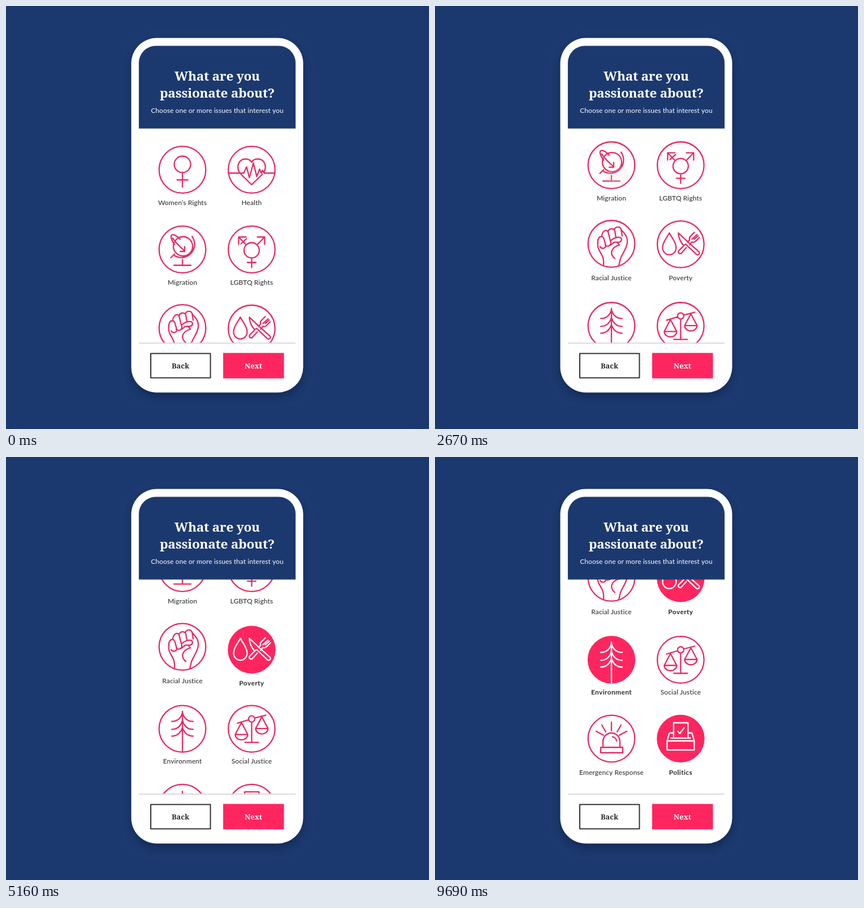
An HTML page with a canvas that plays this animation: 748 by 748 pixels, repeating every 9.72 s.

```html
<!DOCTYPE html>
<html lang="en">
<head>
<meta charset="utf-8">
<title>Choose your issues</title>
<style>
  html, body { margin: 0; width: 100%; height: 100%; overflow: hidden; background: #1c396f; }
  canvas { display: block; }
</style>
</head>
<body>
<canvas id="stage" width="748" height="748"></canvas>
<script>
const ctx = document.getElementById('stage').getContext('2d');
const LOOP = 9720;
const NAVY = '#1c396f', PINK = '#ff265f', LINE = '#e62a63', INK = '#363636';
const SERIF = '"Noto Serif", serif', SANS = 'Lato, sans-serif';

// Icon outlines, relative to the centre of their circle.
const ICONS = {
  venus: 'M14.5 -9.5 A14.5 14.5 0 1 1 -14.5 -9.5 A14.5 14.5 0 1 1 14.5 -9.5 M0 5 V30.5 M-9.5 18 H9.5',
  heart: 'M-41 6 H-14 L-9 -5 L-4 14 L3 -12 L9 12 L14 -1 L17 6 L19 1 L22 6 H41' +
    'M-22 4 C-28 -8 -21 -19 -11 -19 C-5 -19 -2 -17 0 -13 C2 -17 5 -19 11 -19 C21 -19 28 -8 22 4' +
    'M-19 8 L0 26.5 L19 8',
  globe: 'M18 -5.5 A17 17 0 1 1 -16 -5.5 A17 17 0 1 1 18 -5.5' +
    'M17 -23 A23.5 23.5 0 0 1 -14 11 M-20.5 14.5 L-14 8' +
    'M-14 -9 C-20 -17 -22 -25 -18 -26 C-14 -27 -9 -23 -4 -18' +
    'M-17 -20 C-14 -13 -4 -5 4 3 M-4 3.5 H4 V-5 M0 18 V28 M-15 28 H15',
  trans: 'M13.5 1.5 A13.5 13.5 0 1 1 -13.5 1.5 A13.5 13.5 0 1 1 13.5 1.5' +
    'M0 15 V32 M-7.5 23 H7.5 M9.5 -8 L23 -22 M10 -22 H23 V-9' +
    'M-9.5 -8 L-23 -22 M-10 -22 H-23 V-9 M-19 -10 L-9 -19',
  fist: 'M-14 39 C-13 28 -15 23 -19 16 C-23 10 -25 5 -24 0' +
    'C-25 -8 -22 -13 -18 -13 C-15 -13 -14 -11 -13 -8 L-10 3 C-10 8 -17 10 -20 5' +
    'M-17 -13 C-17 -22 -9 -27 -6 -21 L-1 -2 C-1 4 -8 6 -11 2' +
    'M-6 -21 C-5 -28 4 -28 6 -23 L8 -11 M5 -25 C7 -31 15 -31 17 -26 L19 -14' +
    'M17 -25 C25 -17 29 -11 28 -2 C27 8 19 18 16 26 L13 39' +
    'M-2 -5 C3 -10 11 -13 16 -11 C19 -9 18 -4 14 -3 L6 -3 C2 -2 1 2 -3 3' +
    'M11 -2 L14 2 C3 5 -4 14 3 23 L6 26',
  food: 'M-20 -20 C-24 -12 -32 -4 -32 6 A12 12.5 0 0 0 -8 6 C-8 -4 -16 -12 -20 -20 Z' +
    'M-4 -20 L13 -4 L32 13 A3 3 0 0 1 28 18 L9 0 L5 2 C-1 -5 -4 -12 -4 -20 Z' +
    'M5 3 L-3 11 A3 3 0 0 0 1 16 L10 6 M12 -4 L16 -8 M16 1 L20 -4' +
    'M24 -21 L17 -14 C15 -12 15 -10 16 -8 M20 -4 C22 -3 25 -4 27 -6 L33 -12 M20 -9 L29 -17 M24 -9 L31 -15',
  tree: 'M0 -31 V41 M-19 -13 C-9 -13 -2 -19 0 -29 C2 -19 9 -13 19 -13' +
    'M-19 1 C-10 1 -3 -4 0 -15 C3 -4 10 1 19 1 M-19 13 C-11 13 -4 9 0 -2 C4 9 11 13 19 13',
  scales: 'M5.5 -17.5 A5.5 5.5 0 1 1 -5.5 -17.5 A5.5 5.5 0 1 1 5.5 -17.5' +
    'M-25 -10 L-5 -16 M5 -19 L25 -24 M0 -12 V24 M-12 24 H12' +
    'M-18 -11 L-29 10 H-7 Z M-29 10 A11 9.5 0 0 0 -7 10' +
    'M18 -21 L7 -0.5 H29 Z M7 -0.5 A11 9.5 0 0 0 29 -0.5',
  siren: 'M-19 15.5 H20 V25 H-19 Z M-15 15 V5 A15 15 0 0 1 15 5 V15 M2 -3 A8 8 0 0 1 9 4' +
    'M-27 -13 L-14 -6 M-17 -24 L-10 -12 M0 -29 V-14 M17 -24 L10 -12 M27 -13 L14 -6',
  ballot: 'M-12.5 -1 V-28 H13 V-1 M-17 -1 H17 M-5 -13 L-1.5 -9 L6 -19' +
    'M-24 4 H24 V20 H-24 Z M-24 4 L-20 -10 H-13 M13 -10 H20 L24 4'
};

const LEFT = 312, RIGHT = 434.4;
const item = (icon, label, x, y, base, picked = Infinity) =>
  ({ shape: new Path2D(ICONS[icon]), label, x, y, base, picked });

const items = [
  item('venus', 'Women’s Rights', LEFT, 289.5, 351.5),
  item('heart', 'Health', RIGHT, 289.5, 351.5),
  item('globe', 'Migration', LEFT, 430.5, 492.5),
  item('trans', 'LGBTQ Rights', RIGHT, 430.5, 492.5),
  item('fist', 'Racial Justice', LEFT, 569.5, 634),
  item('food', 'Poverty', RIGHT, 570.3, 634, 4150),
  item('tree', 'Environment', LEFT, 714.5, 776, 6650),
  item('scales', 'Social Justice', RIGHT, 714.5, 776),
  item('siren', 'Emergency Response', LEFT, 854, 918),
  item('ballot', 'Politics', RIGHT, 854, 918, 8300)
];
const poverty = items[5];

const touches = [
  { x: 323.5, y: 301, from: 1270, to: 2570 },
  { x: 437, y: 327, from: 3900, to: 4480 },
  { x: 331, y: 372, from: 6120, to: 6780 },
  { x: 434.4, y: 501, from: 7840, to: 8450 }
];

const ramp = (t, start, length) => Math.min(1, Math.max(0, (t - start) / length));
const ease = p => p < 0.5 ? 4 * p ** 3 : 1 - 4 * (1 - p) ** 3;

function text(str, x, y, font, color, spacing = 0) {
  ctx.font = font;
  ctx.letterSpacing = spacing + 'px';
  ctx.fillStyle = color;
  ctx.fillText(str, x, y);
}

function box(x, y, w, h, color, radii = 0) {
  ctx.beginPath();
  ctx.roundRect(x, y, w, h, radii);
  ctx.fillStyle = color;
  ctx.fill();
}

function disc(x, y, r) {
  ctx.beginPath();
  ctx.arc(x, y, r, 0, Math.PI * 2);
}

function drawIcon(shape, x, y, color) {
  ctx.save();
  ctx.translate(x, y);
  ctx.strokeStyle = color;
  ctx.stroke(shape);
  ctx.restore();
}

function drawItem(it, t, dy) {
  const y = it.y + dy, base = it.base + dy;
  if (y < 150 || y > 645) return;
  const on = ramp(t, it.picked, 150);
  ctx.lineWidth = 2.3;
  if (on < 1) {
    disc(it.x, y, 41.3);
    ctx.strokeStyle = LINE;
    ctx.stroke();
    drawIcon(it.shape, it.x, y, LINE);
    ctx.globalAlpha = 1 - on;
    text(it.label, it.x, base, '500 12px ' + SANS, INK, 0.1);
  }
  if (on > 0) {
    ctx.globalAlpha = on;
    disc(it.x, y, 42.2);
    ctx.fillStyle = PINK;
    ctx.fill();
    drawIcon(it.shape, it.x, y, '#fff');
    text(it.label, it.x, base, 'bold 12px ' + SANS, '#2e2e2e', 0.35);
  }
  ctx.globalAlpha = 1;
}

function drawTouch(p, t) {
  const alpha = ramp(t, p.from, 250) - ramp(t, p.to, 250);
  if (alpha <= 0) return;
  ctx.globalAlpha = alpha;
  disc(p.x, p.y, 17);
  ctx.fillStyle = 'rgba(225,225,225,.32)';
  ctx.fill();
  ctx.lineWidth = 1;
  ctx.strokeStyle = 'rgba(205,205,205,.55)';
  ctx.stroke();
  ctx.globalAlpha = 1;
}

function drawPhone() {
  box(0, 0, 748, 748, NAVY);
  ctx.save();
  ctx.shadowColor = 'rgba(0,10,40,.35)';
  ctx.shadowBlur = 17;
  ctx.shadowOffsetY = 7;
  box(221.5, 56.5, 304, 627, '#fff', 45);
  ctx.restore();
}

function drawHeader() {
  ctx.save();
  ctx.shadowColor = 'rgba(0,0,0,.25)';
  ctx.shadowBlur = 2;
  ctx.shadowOffsetY = 0.5;
  box(235, 70.5, 277, 146, NAVY, [30, 30, 0, 0]);
  ctx.restore();
  const title = 'bold 22.5px ' + SERIF;
  text('What are you', 373.5, 131.5, title, '#fff', -0.2);
  text('passionate about?', 373.5, 161.5, title, '#fff', -0.2);
  text('Choose one or more issues that interest you', 373.5, 189, '500 12px ' + SANS, '#e8ecf4', 0.05);
}

function drawFooter() {
  const edge = ctx.createLinearGradient(0, 594, 0, 598);
  edge.addColorStop(0, 'rgba(215,215,215,0)');
  edge.addColorStop(0.6, '#d9d9dc');
  edge.addColorStop(1, '#fff');
  box(235, 594, 277, 4, edge);
  box(235, 598, 277, 62, '#fff');
  ctx.lineWidth = 2;
  ctx.strokeStyle = '#333';
  ctx.strokeRect(256, 614.5, 105.5, 43);
  box(384, 613.5, 107.5, 45, PINK);
  const font = 'bold 12.8px ' + SERIF;
  text('Back', 308.5, 640.5, font, '#2b2b2b');
  text('Next', 437.5, 640.5, font, '#fff');
}

function draw(t) {
  const second = ease(ramp(t, 5000, 850));
  const scroll = 230.5 * ease(ramp(t, 2050, 1120)) + 125.5 * second;

  drawPhone();
  ctx.save();
  ctx.beginPath();
  ctx.rect(235, 216, 277, 381);
  ctx.clip();
  for (const it of items) {
    // The first picked item sits a little low until the list moves on.
    const drop = it === poverty ? 4.5 * ramp(t, it.picked, 150) * (1 - second) : 0;
    drawItem(it, t, drop - scroll);
  }
  ctx.restore();
  drawHeader();
  drawFooter();
  touches.forEach(p => drawTouch(p, t));
}

ctx.textAlign = 'center';
ctx.lineCap = 'round';
ctx.lineJoin = 'round';

const start = performance.now();
function tick() {
  draw((performance.now() - start) % LOOP);
  requestAnimationFrame(tick);
}
tick();
</script>
</body>
</html>
```
